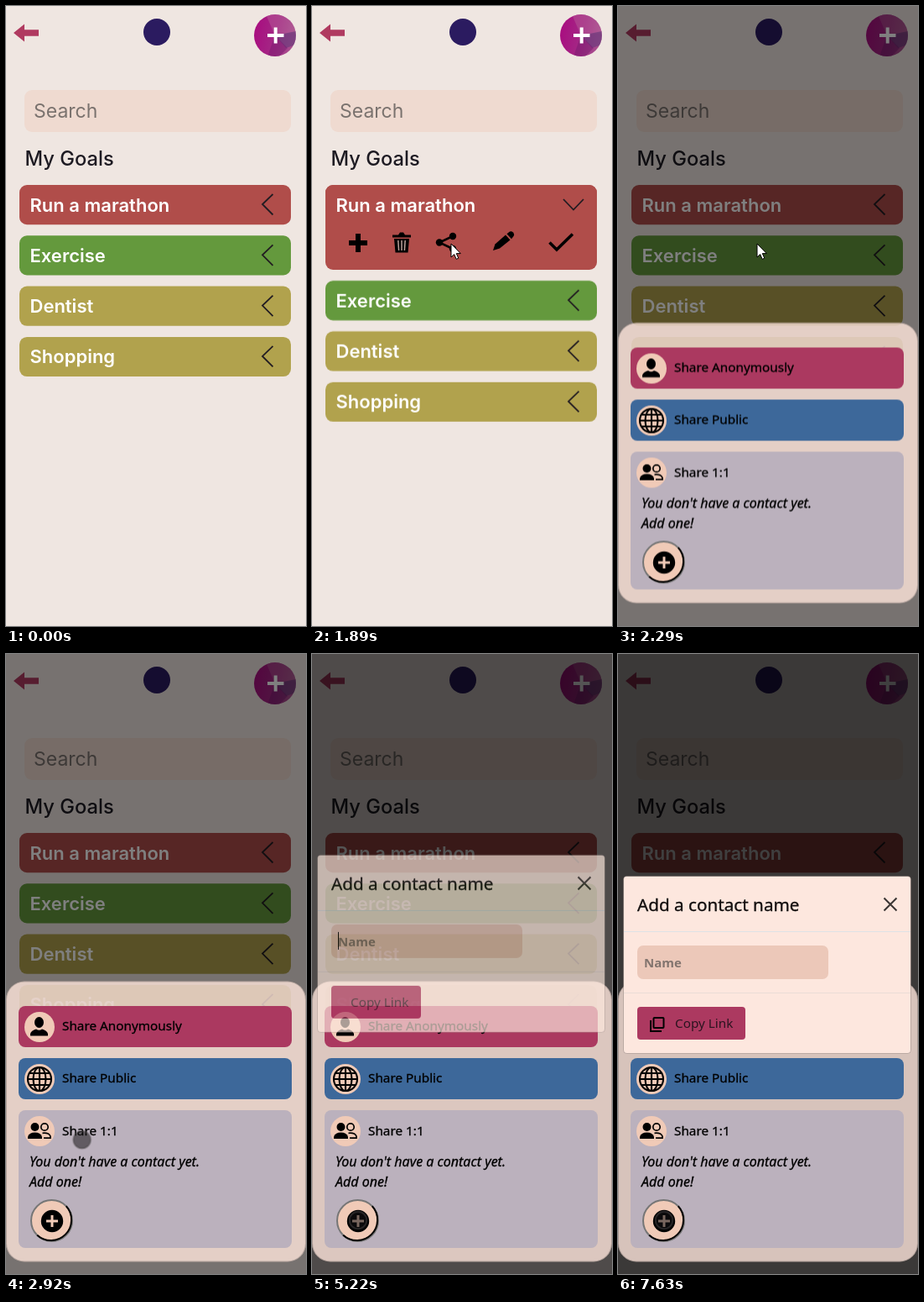
Write an HTML page that moves like this. It is 358 px wide and 738 px high and loops after 8 s.

```html
<!DOCTYPE html>
<html lang="en">
<head>
<meta charset="utf-8">
<title>Sharing a goal</title>
<style>
  html, body { margin: 0; width: 100%; height: 100%; overflow: hidden; background: #efe6e1; }
  svg { display: block; width: 100%; height: 100%; }
  .list { font-family: Inter, sans-serif; }
  .goal { font-size: 22px; font-weight: 600; fill: #fff; }
  .dialog { font: 500 15.3px "Noto Sans", sans-serif; fill: #000; }
  .strong { stroke: #000; stroke-width: .3; }
  .note { font-size: 16px; font-style: italic; }
  .line { fill: none; stroke: #000; }
  .chevron { fill: none; stroke: #221c22; stroke-width: 1.8; }
</style>
</head>
<body>
<svg viewBox="0 0 358 738" preserveAspectRatio="none">
  <defs>
    <linearGradient id="orb" x1="0" y1=".4" x2="1" y2=".6">
      <stop offset="0" stop-color="#a90d80"/>
      <stop offset=".55" stop-color="#a32a85"/>
      <stop offset="1" stop-color="#a95590"/>
    </linearGradient>
    <clipPath id="orbClip"><circle cx="321" cy="35" r="25"/></clipPath>
    <path id="chev" class="chevron" d="M318.500 224L306 236L318.500 248.500"/>
  </defs>

  <rect width="358" height="738" fill="#efe6e1"/>

  <!-- header -->
  <path d="M9 32L22 21.500V28.200H39V35.800H22V42.500Z" fill="#b03a60"/>
  <circle cx="180" cy="31" r="16" fill="#2b1b60"/>
  <g clip-path="url(#orbClip)">
    <rect x="296" y="10" width="50" height="50" fill="url(#orb)"/>
    <path d="M310 10H346V32L321 35Z" fill="#b96a9c" opacity=".4"/>
    <path d="M321 35L346 30V46L334 50Z" fill="#6d3c7c" opacity=".7"/>
    <path d="M321 35L336 50L326 60H312Z" fill="#7a1a70" opacity=".5"/>
  </g>
  <path d="M312 35H331.500M321.700 25.500V44.500" fill="none" stroke="#fff" stroke-width="4"/>

  <!-- goal list -->
  <g class="list">
    <rect x="22" y="100" width="318" height="50" rx="9" fill="#efdad0"/>
    <text x="33" y="133" font-size="23" fill="#7a726e">Search</text>
    <text x="22.500" y="190" font-size="23.700" font-weight="500" fill="#1d1a22">My Goals</text>

    <rect x="16" y="213" width="324" height="47.200" rx="9" fill="#b04d4a"/>
    <g id="tray">
      <rect x="16" y="213" width="324" height="101" rx="9" fill="#b04d4a"/>
      <path class="line" d="M44 282H66M55 271V293" stroke-width="6"/>
      <path d="M96 272.500H103L105 269.500H109L111 272.500H118V275.500H96Z"/>
      <path d="M98 277H116L114.500 293.500H99.500Z"/>
      <path class="line" d="M102.800 279L103.600 291M107 279V291M111.200 279L110.400 291" style="stroke:#b9a09a" stroke-width="1.500"/>
      <path class="line" d="M168 274L152 281.500L168 289" stroke-width="2.500"/>
      <circle cx="152" cy="281.500" r="4.200"/>
      <circle cx="168" cy="274" r="4.200"/>
      <circle cx="168" cy="289" r="4.200"/>
      <path d="M216 291L218.500 283.500L231 272.500L236.500 278.500L224 288.500Z"/>
      <path d="M232.500 271.300L236 268.500Q238 267.500 240 269.500Q242 272 240.500 274L238 277.300Z"/>
      <path class="line" d="M283.500 281.500L292 290L311 271.500" stroke-width="3.600"/>
      <path class="chevron" d="M300 230L312 242.500L324 230"/>
    </g>
    <use id="closedChev" href="#chev"/>
    <text class="goal" x="28.500" y="244.500">Run a marathon</text>
    <g id="rest"></g>
  </g>

  <rect id="shade1" width="358" height="738"/>
  <rect id="shade2" width="358" height="738"/>

  <!-- share sheet -->
  <g id="sheet" class="dialog">
    <rect y="389.500" width="358" height="334" rx="22" fill="#ffe7dd" fill-opacity=".8"/>
    <rect x=".5" y="390" width="357" height="333" rx="21.500" fill="none" stroke="#000" stroke-opacity=".2"/>
    <rect x="15" y="419" width="326" height="49" rx="8" fill="#ab3960"/>
    <rect x="15" y="481" width="326" height="49" rx="8" fill="#3d689a"/>
    <rect x="15" y="543" width="326" height="164" rx="8" fill="#bbb1bd"/>
    <g fill="#f0cab7">
      <circle cx="40" cy="444" r="18"/>
      <circle cx="40" cy="506" r="18"/>
      <circle cx="40" cy="568" r="18"/>
    </g>
    <ellipse cx="39.500" cy="438.500" rx="5.500" ry="6.500"/>
    <path d="M29 454.500V452Q30 448 36 446.500Q39.500 449 43 446.500Q49 448 50 452V454.500Z"/>
    <g class="line" stroke-width="2.100">
      <circle cx="40" cy="506" r="14"/>
      <ellipse cx="40" cy="506" rx="7.500" ry="14"/>
      <path d="M40 492V520M26 506H54M28 499H52M28 513H52"/>
    </g>
    <circle cx="34.500" cy="563" r="5"/>
    <path d="M26 577V574.500Q28 569.500 34.500 569.500Q41 569.500 43 574.500V577Z"/>
    <circle class="line" cx="46" cy="563" r="4.200" stroke-width="1.700"/>
    <path class="line" d="M43.500 570.300Q51 569.500 53 574V576.200H45" stroke-width="1.700"/>
    <g class="strong">
      <text x="67" y="448">Share Anonymously</text>
      <text x="67" y="510">Share Public</text>
      <text x="67" y="573">Share 1:1</text>
      <text class="note" x="28" y="610">You don't have a contact yet.</text>
      <text class="note" x="28" y="634">Add one!</text>
    </g>
    <circle cx="54.500" cy="674.500" r="24.500" fill="#f0cab7" stroke="#767676" stroke-width="2"/>
    <path class="line" d="M71.800 657.200A24.500 24.500 0 0 1 37.200 691.800" stroke-width="2"/>
    <g id="addIcon">
      <circle cx="55" cy="675" r="13.200"/>
      <path d="M48 675H62M55 668V682" stroke="#f0cab7" stroke-width="3"/>
    </g>
  </g>

  <!-- contact dialog -->
  <g id="contact" class="dialog">
    <rect x="6.500" y="264.500" width="343" height="211" rx="4" fill="#fde7de" stroke="#000" stroke-opacity=".2"/>
    <path d="M7 330.500H349" stroke="#dee2e6"/>
    <path d="M7 403.500H349" stroke="#ebdcd6"/>
    <text class="strong" x="23" y="305.500" font-size="20.700" fill="#151010">Add a contact name</text>
    <path class="line" d="M317.500 290.500L332.500 305.500M332.500 290.500L317.500 305.500" style="stroke:#3a3533" stroke-width="2"/>
    <rect x="23" y="347" width="228" height="40" rx="7" fill="#ecc8b9"/>
    <text x="31" y="373" font-size="15" font-weight="600" fill="#82746e">Name</text>
    <rect id="caret" x="31" y="356" width="1" height="21"/>
    <g id="copyPlain">
      <rect x="23" y="420" width="107" height="39" rx="4" fill="#ac3960"/>
      <text x="46" y="445" fill="#2c1420">Copy Link</text>
    </g>
    <g id="copyIcon">
      <rect x="23" y="420" width="129" height="39" rx="4" fill="#ac3960"/>
      <rect class="line" x="42.500" y="433" width="12" height="12" rx="1" stroke-width="2"/>
      <path class="line" d="M39 436V449H52" stroke-width="2"/>
      <text x="68" y="445" fill="#2c1420">Copy Link</text>
    </g>
  </g>

  <!-- pointers -->
  <g id="touch">
    <circle id="dot" r="10.300" fill="#141214" fill-opacity=".54" stroke="#4a4648" stroke-opacity=".5" stroke-width="2"/>
  </g>
  <path id="mouse" d="M166 283V299L169.700 295.600L172.200 301.300L174.800 300.200L172.300 294.600H177.300Z" fill="#fff" stroke="#000"/>
</svg>
<script>
const LOOP = 8000;
const $ = id => document.getElementById(id);

const goals = [['Exercise', '#64993d'], ['Dentist', '#b1a24d'], ['Shopping', '#b1a24d']];
$('rest').innerHTML = goals.map(([name, color], i) => {
  const y = 213 + 60.3 * (i + 1);
  return `
  <rect x="16" y="${y}" width="324" height="47.2" rx="9" fill="${color}"/>
  <text class="goal" x="28.5" y="${y + 31.5}">${name}</text>
  <use href="#chev" y="${y - 213}"/>`;
}).join('');

// Steps are [ms, value, easing towards the next step].
function play(id, prop, steps, easing = 'linear') {
  const first = steps[0], last = steps[steps.length - 1];
  const all = [...steps];
  if (first[0] > 0) all.unshift([0, first[1]]);
  if (last[0] < LOOP) all.push([LOOP, last[1]]);
  const frames = all.map(([ms, value, ease]) =>
    ({ offset: ms / LOOP, [prop]: value, easing: ease || easing }));
  $(id).animate(frames, { duration: LOOP, iterations: Infinity });
}

const move = (x, y) => `translate(${x}px, ${y}px)`;

// Toggles visibility at each given time, starting hidden unless told otherwise.
function toggle(id, times, shown = 0) {
  play(id, 'opacity', [[0, shown], ...times.map((ms, i) => [ms, (i + 1 + shown) % 2])], 'step-end');
}

// Dialogs fade in over 150 ms while dropping 50 px over 300 ms.
function openDialog(id, shade, start) {
  play(shade, 'opacity', [[start, 0], [start + 150, 0.5]]);
  play(id, 'opacity', [[start, 0], [start + 150, 1]]);
  play(id, 'transform', [[start, move(0, -50), 'ease-out'], [start + 300, move(0, 0)]]);
}

const EXPAND = 1000, COLLAPSE = 2095;
toggle('tray', [EXPAND, COLLAPSE]);
toggle('closedChev', [EXPAND, COLLAPSE], 1);
play('rest', 'transform', [[0, move(0, 0)], [EXPAND, move(0, 53.7)], [COLLAPSE, move(0, 0)]], 'step-end');

openDialog('sheet', 'shade1', 2122);
toggle('addIcon', [2200]);
openDialog('contact', 'shade2', 5119);
toggle('copyPlain', [5270], 1);
toggle('copyIcon', [5270]);
toggle('caret', [5140, 5640, 6160, 6640, 7150, 7630]);

toggle('touch', [130, 1890, 2360]);
toggle('mouse', [1890, 2360]);
play('dot', 'transform', [
  [130, 290, 726], [500, 312, 480], [760, 315, 262, 'ease-out'], [870, 308, 244],
  [1000, 308, 244], [1070, 308, 245, 'ease-in-out'], [1760, 160, 283],
  [2360, 160, 300], [2640, 155, 367, 'ease-out'], [3210, 60, 679],
  [3600, 60, 679], [3810, 48, 643], [4140, 48, 643, 'ease-in-out'], [4550, 55, 674]
].map(([ms, x, y, ease]) => [ms, move(x, y), ease]));
</script>
</body>
</html>
```
